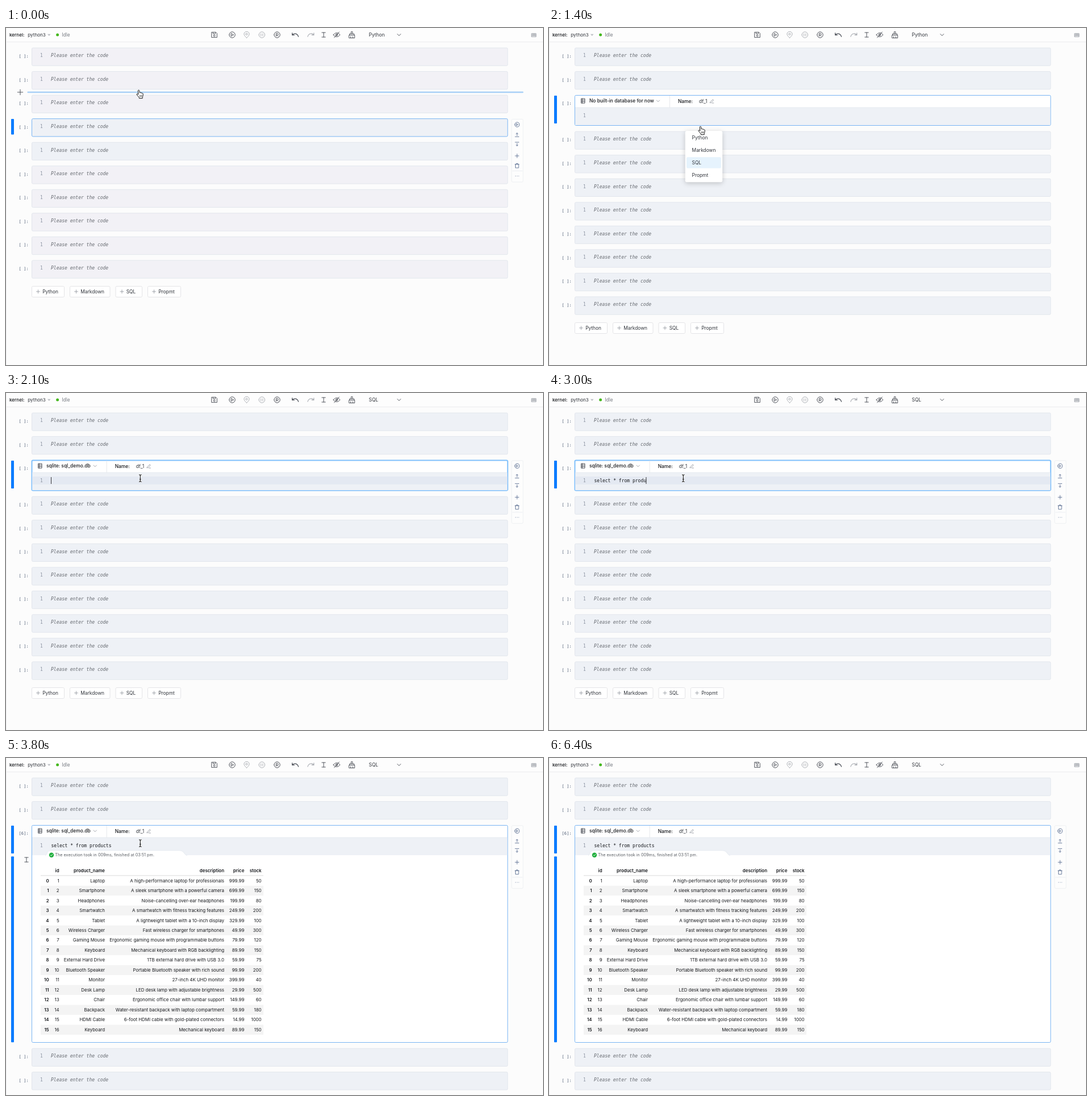
Recreate the animation shown at these times as an HTML page. Size 945 px wide and 593 px high, loop 7.2 s.

```html
<!DOCTYPE html>
<html lang="en">
<head>
<meta charset="utf-8">
<title>Notebook SQL cell</title>
<style>
html, body { margin: 0; width: 100%; height: 100%; overflow: hidden; background: #fcfcfc; }
svg { display: block; font: 8.4px Inter, "Liberation Sans", sans-serif; }
text { white-space: pre; fill: #30343b; }
.mono { font: 8px "DejaVu Sans Mono", "Liberation Mono", monospace; }
.hint { font-style: italic; fill: #666a70; }
.num { fill: #8d95a3; }
.prompt { font-size: 7.1px; fill: #46566f; }
.mid { font-weight: 500; fill: #17191d; }
.note { font-size: 7.25px; fill: #5c6066; }
.table text { font-size: 7.9px; fill: #17191d; text-anchor: end; }
.table .head { font-weight: 600; }
.icon { fill: none; stroke: #4b4f57; stroke-width: .95; stroke-linecap: round; stroke-linejoin: round; }
.side .icon { stroke: #53688d; stroke-width: .85; }
.dim { stroke: #a9acb2; }
.thin { stroke: #8d929b; stroke-width: .8; }
</style>
</head>
<body>
<script>
const NS = 'http://www.w3.org/2000/svg';
const LOOP = 7200, STEP = 100;
const BLUE = '#0a7cff', CELL = '#eef1f6';
const TOP = 35, PITCH = 41.55;
const QUERY = 'select * from products', CHAR = 4.816;

function add(parent, tag, attrs = {}, content) {
  const el = document.createElementNS(NS, tag);
  for (const key in attrs) el.setAttribute(key, attrs[key]);
  if (content !== undefined) el.textContent = content;
  parent.append(el);
  return el;
}
const group = (p, attrs) => add(p, 'g', attrs);
const text = (p, x, y, s, cls = '') => add(p, 'text', { x, y, class: cls }, s);
const rect = (p, x, y, width, height, fill, more) =>
  add(p, 'rect', { x, y, width, height, fill, ...more });
const icon = (p, x, y, d, cls = '') =>
  add(p, 'path', { d, class: 'icon ' + cls, transform: `translate(${x} ${y})` });
const show = (el, on) => el.setAttribute('display', on ? 'inline' : 'none');
const move = (el, x, y) => el.setAttribute('transform', `translate(${x} ${y})`);

const ring = r => `M${-r} 0A${r} ${r} 0 1 1 ${r} 0A${r} ${r} 0 1 1 ${-r} 0`;
const PLAY = ring(5.2) + 'M-1.5 -2.3L2.4 0L-1.5 2.3Z';
const PLUS = 'M-3 0H3M0 -3V3';
const CHEVRON = 'M-2.6 -1.2L0 1.5L2.6 -1.2';
const SPAN = 'M-3.2 -4H3.2M-3.2 4H3.2M0 -4V4';
const PENCIL = 'M-2.8 1.3L1.6 -3L3 -1.6L-1.3 2.6L-3.2 3ZM0 3.3H3.2';

const svg = add(document.body, 'svg', { width: 945, height: 593, viewBox: '0 0 945 593' });
rect(svg, 0, 0, 945, 593, '#fcfcfc');

// Plain cells
function makeCell(i) {
  const g = group(svg);
  text(g, 22.6, 17, '[ ]:', 'mono prompt');
  const box = rect(g, 45.5, 0, 837.3, 31.3, CELL, { rx: 2, stroke: '#e2e6ed' });
  text(g, 60, 16.4, '1', 'mono num');
  text(g, 79, 16.4, 'Please enter the code', 'mono hint');
  return { g, box, y: TOP + PITCH * i };
}
const cells = Array.from({ length: 10 }, (_, i) => makeCell(i));
const selectBar = rect(svg, 9, 160, 5, 27.5, BLUE, { rx: 1 });

// Add-cell buttons
const buttons = group(svg);
for (const [x, w, label] of [[45.5, 57, 'Python'], [112.5, 70.5, 'Markdown'], [193, 46.5, 'SQL'], [249.5, 58, 'Propmt']]) {
  rect(buttons, x, 454.5, w, 19, '#fff', { rx: 2, stroke: '#e4e4e7' });
  icon(buttons, x + 11, 463.8, PLUS, 'thin');
  text(buttons, x + 18.7, 466.7, label);
}

// SQL cell
const sql = group(svg);
rect(sql, 9, 119, 5, 49, BLUE, { rx: 1 });
const outBar = rect(sql, 9, 173.3, 5, 10, BLUE, { rx: 1 });
const prompt = text(sql, 22.6, 135.3, '', 'mono prompt');
const frame = rect(sql, 45.5, 118.5, 837.3, 53, '#fff', { rx: 2 });
rect(sql, 46.2, 140, 836, 31, CELL);
const lineGlow = rect(sql, 46.2, 147, 836, 13.8, '#e4e9f2');
add(sql, 'path', { d: 'M46 140H882', stroke: '#e6eaf0' });
icon(sql, 60, 128.2, 'M-3 -4H3V4H-3ZM-3 -1.3H3M-3 1.4H3M-1.5 -4V4');
const dbName = text(sql, 71, 131, '', 'mid');
const meta = group(sql);
icon(meta, 192, 128.3, CHEVRON, 'thin');
add(meta, 'path', { d: 'M212.5 119V140', stroke: '#e6e8ec' });
text(meta, 227, 131.6, 'Name:', 'mid');
text(meta, 264, 131.6, 'df_1');
icon(meta, 286.7, 128.7, PENCIL, 'thin');
text(sql, 60, 156.6, '1', 'mono num');
const code = text(sql, 79.5, 156.6, '', 'mono mid');
const caret = rect(sql, 79, 148, .9, 12, '#222');

// Execution status and result
const status = group(sql);
add(status, 'path', { d: 'M69 171.6C73 171 71 162.8 79 162.8H305C314 162.8 313 171 319 171.6Z', fill: '#fff' });
add(status, 'path', { d: 'M69 171.3C73 171 71 162.8 79 162.8H305C314 162.8 313 171 319 171.3', fill: 'none', stroke: '#e0e5ed', 'stroke-width': .7 });
const dot = add(status, 'circle', { cx: 80, cy: 170.7, r: 4.2 });
const mark = icon(status, 80, 170.7, '');
mark.style.stroke = '#fff';
const note = text(status, 86.3, 173.3, '', 'note');

const PRODUCTS = `Laptop|A high-performance laptop for professionals|999.99|50
Smartphone|A sleek smartphone with a powerful camera|699.99|150
Headphones|Noise-cancelling over-ear headphones|199.99|80
Smartwatch|A smartwatch with fitness tracking features|249.99|200
Tablet|A lightweight tablet with a 10-inch display|329.99|100
Wireless Charger|Fast wireless charger for smartphones|49.99|300
Gaming Mouse|Ergonomic gaming mouse with programmable buttons|79.99|120
Keyboard|Mechanical keyboard with RGB backlighting|89.99|150
External Hard Drive|1TB external hard drive with USB 3.0|59.99|75
Bluetooth Speaker|Portable Bluetooth speaker with rich sound|99.99|200
Monitor|27-inch 4K UHD monitor|399.99|40
Desk Lamp|LED desk lamp with adjustable brightness|29.99|500
Chair|Ergonomic office chair with lumbar support|149.99|60
Backpack|Water-resistant backpack with laptop compartment|59.99|180
HDMI Cable|6-foot HDMI cable with gold-plated connectors|14.99|1000
Keyboard|Mechanical keyboard|89.99|150`.split('\n').map(row => row.split('|'));
const COLUMNS = [75.6, 93.6, 174, 384, 419.3, 449.6];
const table = group(sql, { class: 'table' });
const tableRow = (y, values, head) => values.forEach((v, c) =>
  text(table, COLUMNS[c], y, v, head || c === 0 ? 'head' : ''));
tableRow(200.6, ['', 'id', 'product_name', 'description', 'price', 'stock'], true);
add(table, 'path', { d: 'M61 206.9H453', stroke: '#d2d2d2', 'stroke-width': .8 });
PRODUCTS.forEach((product, i) => {
  const y = 207.2 + 17.48 * i;
  if (i % 2) rect(table, 61, y, 392, 17.48, '#f4f4f4');
  tableRow(y + 11.4, [i, i + 1, ...product]);
});
const resizeIcon = icon(sql, 36, 179, SPAN);

// Insertion line
const insertLine = group(svg);
icon(insertLine, 25, 113, 'M-4.7 0H4.7M0 -4.7V4.7');
rect(insertLine, 37.5, 111.7, 873, 2.5, '#a8d0f6', { rx: 1 });

// Cell tools
const side = group(svg, { class: 'side' });
rect(side, 889.8, 160.5, 20.2, 110.5, '#fdfdfd', { rx: 2, stroke: '#eef0f3' });
icon(side, 899.3, 170, ring(4.1) + 'M-1.2 -1.8L1.9 0L-1.2 1.8Z');
icon(side, 899.3, 187.8, 'M-3.3 3.5H3.3M0 1.6V-3M-1.6 -1.5L0 -3.1L1.6 -1.5');
icon(side, 899.3, 204.5, 'M-3.3 -3.5H3.3M0 -1.5V3M-1.6 1.5L0 3.1L1.6 1.5');
icon(side, 899.3, 225, 'M-3.3 0H3.3M0 -3.3V3.3');
icon(side, 899.3, 242.3, 'M-3.6 -2.4H3.6M-1.3 -2.4V-3.8H1.3V-2.4M-2.8 -2.4V3.8H2.8V-2.4');
add(side, 'path', { d: 'M891 251.5H909', stroke: '#eceef2' });
icon(side, 899.3, 260.5, 'M-2.8 0H-2.7M0 0H.1M2.8 0H2.9');

// Top bar
rect(svg, 0, 0, 945, 24, '#fdfdfd');
add(svg, 'path', { d: 'M0 24.5H945', stroke: '#ebebed' });
add(svg, 'path', { d: 'M.5 0V593', stroke: '#f0f0f1' });
text(svg, 6, 14.7, 'kernel:', 'mid').style.fontSize = '8.1px';
text(svg, 38.3, 14.7, 'python3').style.fontSize = '8.1px';
add(svg, 'path', { d: 'M73 10.8H78.6L75.8 14Z', fill: '#bcbfc4' });
add(svg, 'circle', { cx: 90.6, cy: 12, r: 2.5, fill: '#45b81e' });
text(svg, 98.3, 14.9, 'Idle').style.fill = '#777b82';
icon(svg, 366.6, 12, 'M-4.5 -4.6H2.8L4.7 -2.6V4.6H-4.5ZM-2.2 -4.4V-1.7H1.7V-4.4' + 'M-1.4 1.6A1.4 1.4 0 1 1 1.4 1.6A1.4 1.4 0 1 1 -1.4 1.6');
icon(svg, 398, 12, PLAY);
icon(svg, 423.5, 12, 'M0 5.4C-3 2.4 -4.6 .6 -4.6 -1.4A4.6 4.3 0 0 1 4.6 -1.4C4.6 .6 3 2.4 0 5.4ZM-1.6 -1.2A1.6 1.6 0 1 1 1.6 -1.2A1.6 1.6 0 1 1 -1.6 -1.2', 'dim');
const pause = icon(svg, 450.3, 12, ring(5.2) + 'M-1.6 -2V2M1.6 -2V2');
icon(svg, 477, 12, ring(5.2) + 'M-1.6 2.6V-2.5H.6A1.5 1.5 0 0 1 .6 .5H-1.6M.4 .5L2 2.6');
icon(svg, 509, 12, 'M-5.3 -3.2V.4H-1.7M-5 .2C-2.4 -3 3.6 -3.4 5.6 3.2').style.strokeWidth = 1.3;
icon(svg, 536.5, 12, 'M5.3 -3.2V.4H1.7M5 .2C2.4 -3 -3.6 -3.4 -5.6 3.2', 'dim').style.strokeWidth = 1.2;
icon(svg, 559, 12, SPAN);
icon(svg, 582, 12, 'M-5.7 0C-3.2 -4.6 3.2 -4.6 5.7 0C3.2 4.6 -3.2 4.6 -5.7 0ZM-1.7 0A1.7 1.7 0 1 1 1.7 0A1.7 1.7 0 1 1 -1.7 0M-4.3 5L4.3 -5');
icon(svg, 608.6, 12, 'M-5 5.2V.6H5V5.2ZM-4 .6V-1.8H4V.6M-1.3 -1.8V-5.4H1.3V-1.8M-2 5V3M1.8 5V3');
const language = text(svg, 638.6, 14.8, 'Python');
icon(svg, 691.7, 12, 'M-2.9 -1.4L0 1.6L2.9 -1.4');
icon(svg, 929, 12.5, 'M-3.8 -2.8H3.8V3H-3.8ZM-3.6 -.8H3.6M-3.6 1H3.6M-1.3 -2.6V1M1.3 -2.6V1', 'thin');

// Cell type menu
const menu = group(svg);
rect(menu, 239.7, 117, 65.5, 90.3, '#fff', { rx: 3, style: 'filter:drop-shadow(0 2px 4px #0003)' });
const hover = rect(menu, 242, 0, 60.8, 19.5, '#e6f3fd', { rx: 2 });
['Python', 'Markdown', 'SQL', 'Propmt'].forEach((s, i) => text(menu, 251.6, 131.5 + 22.2 * i, s));

// Pointers
const hand = group(svg);
add(hand, 'path', {
  d: 'M-1.2 .6C-1.2 -.8 1 -.8 1.2 .6L1.7 4.2C2.2 3.5 3.6 3.6 3.8 4.6C4.5 4 5.7 4.3 5.8 5.2C6.8 4.8 7.7 5.4 7.7 6.5C7.8 9 7.3 10.6 6.7 12V14H.8V12.6C-.8 11 -2 8.8 -3.5 7.4C-3.8 6 -2.2 5.6 -.9 7.2L-.6 7.4Z',
  fill: '#fff', stroke: '#111', 'stroke-width': 1, 'stroke-linejoin': 'round'
});
add(hand, 'path', { d: 'M2 8.5V11.5M3.8 8.5V11.5M5.5 8.5V11.5', stroke: '#111', 'stroke-width': .7 });
const beam = group(svg);
const BEAM = 'M-2.3 -6.2C-.8 -6.2 0 -5.6 0 -4.8C0 -5.6 .8 -6.2 2.3 -6.2M0 -4.8V4.8M-2.3 6.2C-.8 6.2 0 5.6 0 4.8C0 5.6 .8 6.2 2.3 6.2M-1.2 1.6H1.2';
add(beam, 'path', { d: BEAM, fill: 'none', stroke: '#fff', 'stroke-width': 2.4 });
add(beam, 'path', { d: BEAM, fill: 'none', stroke: '#111', 'stroke-width': 1.1 });

// time, x, y
const PATH = [
  [0, 233.5, 109.7], [300, 240, 112], [500, 243, 118], [900, 260.5, 147.7],
  [1200, 266.5, 173.7], [1600, 266.5, 173.7], [1800, 128, 126], [1900, 128, 126],
  [2100, 236.3, 150], [5600, 236.3, 150], [6200, 955, 190]
];
function pointerAt(t) {
  const next = PATH.findIndex(k => k[0] > t);
  if (next < 0) return PATH[PATH.length - 1].slice(1);
  const [t0, x0, y0] = PATH[next - 1], [t1, x1, y1] = PATH[next];
  const u = (t - t0) / (t1 - t0), e = u * u * (3 - 2 * u);
  return [x0 + (x1 - x0) * e, y0 + (y1 - y0) * e];
}

function render(t) {
  const inserted = t >= 1400, chosen = t >= 1900;
  const focused = t >= 2100 && t < 3300;
  const queued = t >= 3300, done = t >= 3600;
  const shift = done ? 393 : queued ? 76.5 : inserted ? 64 : 0;
  const [x, y] = pointerAt(t);

  cells.forEach(({ g, box, y: top }, i) => {
    const picked = i === 3 && !inserted;
    move(g, 0, top + (i > 1 ? shift : 0));
    box.setAttribute('stroke', picked ? '#79b4f3' : '#e2e6ed');
    box.setAttribute('fill', t < STEP && i !== 3 && i !== 4 ? '#f2f1f6' : CELL);
  });
  move(buttons, 0, shift);
  show(selectBar, !inserted);
  show(insertLine, !inserted);
  show(side, !inserted || t >= 1700);
  move(side, 0, inserted ? -41.6 : 0);

  show(sql, inserted);
  dbName.textContent = chosen ? 'sqlite: sql_demo.db' : 'No built-in database for now';
  move(meta, chosen ? -35.3 : 0, 0);
  prompt.textContent = done ? '[6]:' : queued ? '[*]:' : '[ ]:';
  frame.setAttribute('height', done ? 382 : queued ? 65 : 53);
  frame.setAttribute('stroke', focused ? '#80c0fb' : '#79b4f3');
  frame.setAttribute('stroke-width', focused ? 2 : 1);
  const typed = Math.round(QUERY.length * Math.min(1, Math.max(0, (t - 2300) / 800)));
  code.textContent = QUERY.slice(0, typed);
  caret.setAttribute('x', 79 + typed * CHAR);
  show(caret, focused);
  show(lineGlow, focused);

  show(status, queued);
  show(outBar, queued);
  outBar.setAttribute('height', done ? 327 : 10);
  dot.setAttribute('fill', done ? '#1fae3c' : '#147fe8');
  mark.setAttribute('d', done ? 'M-1.9 .1L-.5 1.5L2 -1.3' : 'M0 -.4V2M0 -2.1V-2');
  note.textContent = done ? 'The execution took in 009ms, finished at 03:51 pm.' : 'execution queued.';
  show(table, done);
  show(resizeIcon, done && t < 6000);
  pause.setAttribute('class', queued && !done ? 'icon' : 'icon dim');
  language.textContent = t >= 1700 ? 'SQL' : 'Python';

  show(menu, t >= 500 && t < 1600);
  move(menu, 0, inserted ? 64 : 0);
  show(hover, t > 900);
  hover.setAttribute('y', 118.9 + 22.2 * (t >= 1100 ? 2 : 1));

  show(hand, t < 2000);
  move(hand, x, y);
  show(beam, t >= 2000 && t < 6200);
  move(beam, x, y);
}

const start = performance.now();
function tick() {
  const t = (performance.now() - start) % LOOP;
  render(Math.floor(t / STEP) * STEP);
  requestAnimationFrame(tick);
}
tick();
</script>
</body>
</html>
```
